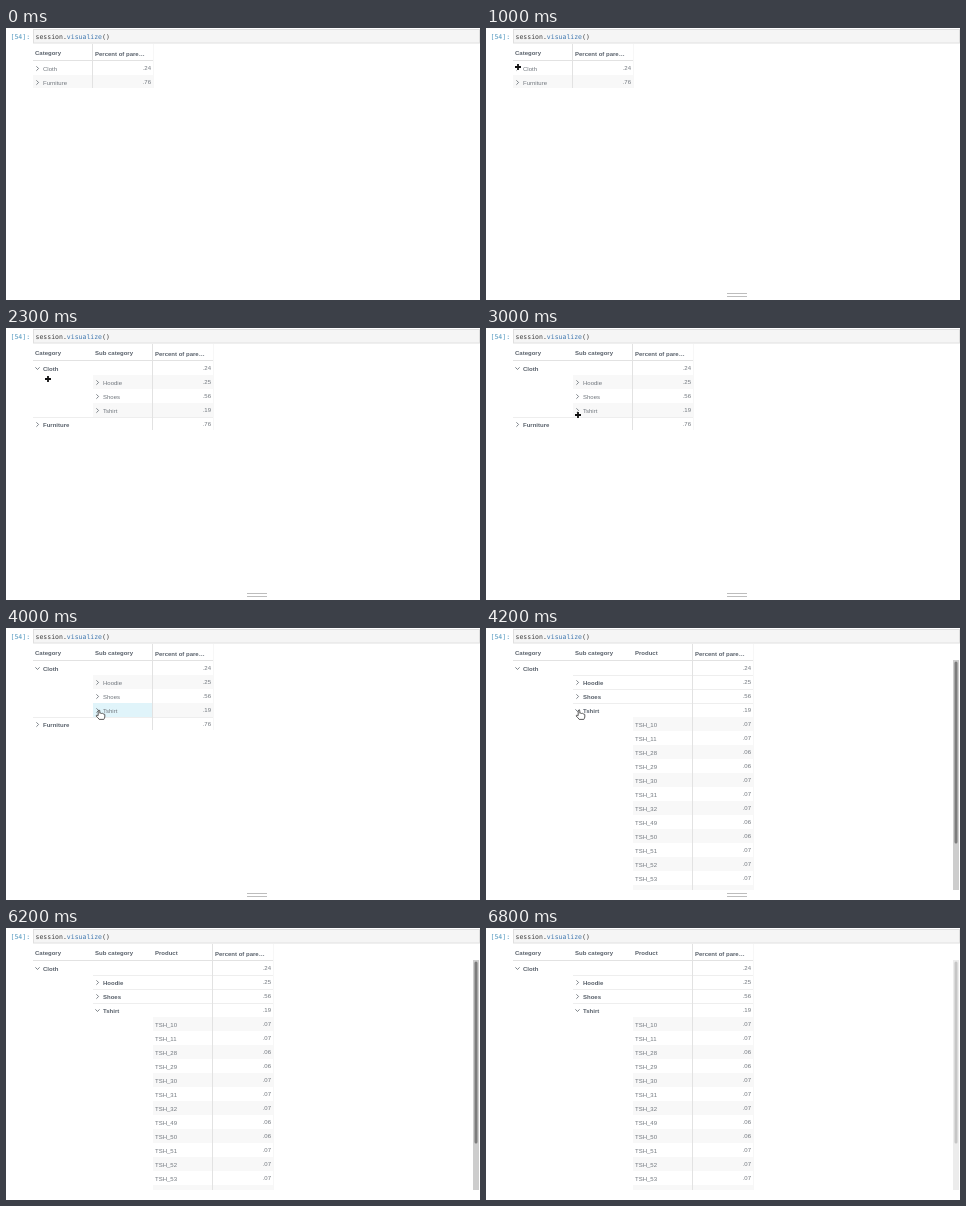
Animation, 474 px wide and 272 px high, one loop 6.9 s. Source, as an HTML page:

```html
<!DOCTYPE html>
<html lang="en">
<head>
<meta charset="utf-8">
<title>Pivot table drill-down</title>
<style>
html, body { margin: 0; width: 100%; height: 100%; overflow: hidden; background: #fff; }
svg { display: block; width: 474px; height: 272px; }
text { font: 6px "Liberation Sans", Arial, sans-serif; fill: #70767d; white-space: pre; }
.bold { font-weight: bold; fill: #59616b; }
.code { font: 6.5px "DejaVu Sans Mono", monospace; fill: #3c3c3c; }
.prompt { fill: #4c94bd; }
.call { fill: #3f78b0; }
.chevron { fill: none; stroke: #70767d; stroke-width: .9; }
.hand { fill: #fff; stroke: #333; stroke-width: .8; stroke-linejoin: round; }
</style>
</head>
<body>
<svg id="stage" viewBox="0 0 474 272">
  <rect x="27.5" y="1.5" width="446" height="13.5" fill="#f5f5f5" stroke="#e0e0e0"/>
  <text class="code prompt" x="4.5" y="10.5">[54]:</text>
  <text class="code" x="29.5" y="10.5">session.<tspan class="call">visualize</tspan>()</text>
</svg>
<script>
const LOOP = 6900, STEP = 100;
const LEFT = 27, COL = 60, TOP = 33, ROW = 14;
const stage = document.getElementById("stage");

function add(parent, tag, attrs, content) {
  const el = document.createElementNS("http://www.w3.org/2000/svg", tag);
  for (const key in attrs) el.setAttribute(key, attrs[key]);
  if (content) el.textContent = content;
  parent.appendChild(el);
  return el;
}
const box = (parent, x, y, width, height, fill) =>
  add(parent, "rect", { x, y, width, height, fill });

// A row is [column, label, value, chevron, bold, striped].
function table(headers, rows, bottom) {
  const g = add(stage, "g", {});
  const last = LEFT + headers.length * COL;
  const right = last + COL;

  rows.forEach(([col, label, value, chevron, bold, striped], i) => {
    const x = LEFT + col * COL, y = TOP + i * ROW;
    const height = Math.min(ROW, bottom - y);
    if (striped) box(g, x, y, right - x, height, "#f8f8f8");
    if (bold && i) box(g, x, y, right - x, 1, "#eeeeee");
    if (!label) return;
    if (chevron) {
      const d = chevron === "open"
        ? `M${x + 2.4} ${y + 6.3}l2.1 2.2 2.1-2.2`
        : `M${x + 3.4} ${y + 5.3}l2.2 2.2-2.2 2.2`;
      add(g, "path", { d, class: "chevron" });
    }
    add(g, "text", { x: x + (chevron ? 10 : 2), y: y + 9.7, class: bold ? "bold" : "" }, label);
    add(g, "text", { x: right - 2, y: y + 9.2, "text-anchor": "end" }, value);
  });

  headers.forEach((name, i) =>
    add(g, "text", { x: LEFT + 2 + i * COL, y: 27, class: "bold" }, name));
  add(g, "text", { x: last + 2, y: 27.6, class: "bold" }, "Percent of pare…");
  box(g, LEFT, 32, right - LEFT, 1, "#e2e2e2");
  box(g, last - 1, 16, 1, bottom - 16, "#e2e2e2");
  box(g, right, 16, .5, bottom - 16, "#eeeeee");
  return g;
}

const closed = table(["Category"], [
  [0, "Cloth", ".24", "shut"],
  [0, "Furniture", ".76", "shut", false, true],
], 60);

const opened = table(["Category", "Sub category"], [
  [0, "Cloth", ".24", "open", true],
  [1, "Hoodie", ".25", "shut", false, true],
  [1, "Shoes", ".56", "shut"],
  [1, "Tshirt", ".19", "shut", false, true],
  [0, "Furniture", ".76", "shut", true],
], 102);
const glow = box(opened, 87, 75, 59, 14, "#e0f4fa");
opened.prepend(glow);
// The glow sits above the stripes but below the labels.
opened.insertBefore(glow, [...opened.querySelectorAll("text")].find(t => t.textContent === "Tshirt").previousSibling);

const products = [10, 11, 28, 29, 30, 31, 32, 49, 50, 51, 52, 53];
const light = [28, 29, 49, 50];
const full = table(["Category", "Sub category", "Product"], [
  [0, "Cloth", ".24", "open", true],
  [1, "Hoodie", ".25", "shut", true],
  [1, "Shoes", ".56", "shut", true],
  [1, "Tshirt", ".19", "open", true],
  ...products.map((n, i) =>
    [2, "TSH_" + n, light.includes(n) ? ".06" : ".07", "", false, i % 2 === 0]),
  [2, "", "", "", false, true],
], 262);

const track = box(full, 467, 32, 6, 230, "#cdcdcd");
const thumb = add(full, "rect", { x: 468.5, y: 33.5, width: 3, height: 182, rx: 1.5 });

const handle = add(stage, "g", {});
box(handle, 241, 265, 20, 1, "#bdbdbd");
box(handle, 241, 268, 20, 1, "#bdbdbd");

const cross = add(stage, "g", {});
add(cross, "path", { d: "M-3.4 0H3.4M0-3.4V3.4", stroke: "#fff", "stroke-width": 3 });
add(cross, "path", { d: "M-3 0H3M0-3V3", stroke: "#111", "stroke-width": 1.8 });
const hand = add(stage, "path", {
  class: "hand",
  d: "M-.8 5.5V.6Q0-.5 .8 .6V3.2Q2 2.7 2.6 3.5 3.8 3 4.2 3.9 5.6 3.6 5.8 4.8V7Q5.6 8.4 4.8 9.4H.2Q-.8 7.8-3 5.9-2.6 4.5-.8 5.5Z",
});

// Pointer poses: [start, shape, x, y], each held until the next.
const poses = [
  [0], [600, cross, 45, 9], [700, cross, 38, 17], [800, cross, 31, 27],
  [900, cross, 29, 35], [1000, cross, 32, 39], [1100, cross, 33, 41],
  [1200, hand, 33, 39], [1400, hand, 33, 39.5], [1500, hand, 33, 39],
  [2200, cross, 35, 45], [2300, cross, 42, 51], [2400, cross, 54, 60],
  [2500, cross, 68, 70], [2600, cross, 79, 78], [2700, cross, 85, 82],
  [2800, cross, 88, 84], [2900, cross, 90, 86], [3000, cross, 92, 87],
  [3300, cross, 92.5, 86], [3400, cross, 92.5, 85], [3700, cross, 92.5, 85.5],
  [3800, hand, 93, 82], [4800, cross, 90, 78], [4900, cross, 80, 61],
  [5000, cross, 66, 43], [5100, cross, 55, 28], [5200, cross, 47, 15],
  [5300, cross, 43, 4], [5400],
];

const show = (el, on) => el.setAttribute("visibility", on ? "inherit" : "hidden");

function draw(time) {
  const t = Math.floor(time % LOOP / STEP) * STEP;
  const within = (from, to) => t >= from && t < to;
  show(closed, t < 1700);
  show(opened, within(1700, 4200));
  show(glow, within(4000, 4200));
  show(full, t >= 4200);
  show(handle, within(600, 5400));
  const idle = t >= 6800;
  track.setAttribute("fill", idle ? "#ececec" : "#cdcdcd");
  thumb.setAttribute("fill", idle ? "#c6c6c6" : "#7c7c7c");

  const [, shape, x, y] = poses.filter(p => p[0] <= t).pop();
  for (const el of [cross, hand]) show(el, el === shape);
  if (shape) shape.setAttribute("transform", `translate(${x} ${y})`);
}

const start = performance.now();
function tick() {
  draw(performance.now() - start);
  requestAnimationFrame(tick);
}
tick();
</script>
</body>
</html>
```
